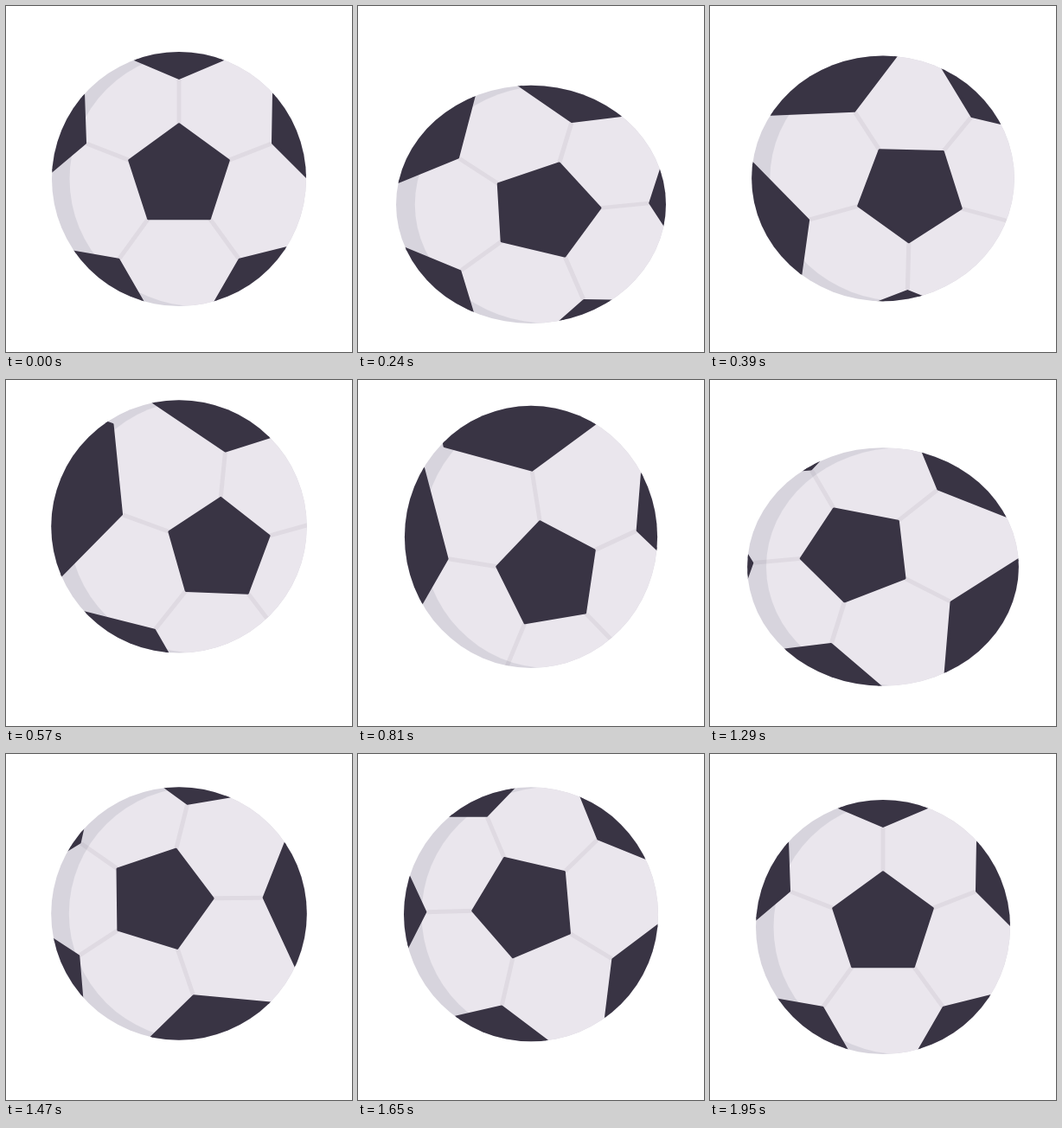
An HTML page with a canvas for the animation above (2040 ms loop, 400 by 400 pixels).

```html
<!DOCTYPE html>
<html lang="en">
<head>
<meta charset="utf-8">
<title>Bouncing ball</title>
<style>
html, body { margin: 0; width: 100%; height: 100%; overflow: hidden; background: #fff; }
canvas { display: block; }
</style>
</head>
<body>
<canvas id="stage" width="400" height="400"></canvas>
<script>
const ctx = document.getElementById('stage').getContext('2d');
const DARK = '#393444', LIGHT = '#eae6ed', SHADE = '#d7d4dd', SEAM = 'rgba(40,30,50,.055)';
const LOOP = 2040, STEP = 30, END = 1950, R = 147, RAD = Math.PI / 180;

const smooth = u => u * u * (3 - 2 * u);
const fall = u => u * u * (2 - u);          // eases out of rest, hits at full speed
const rise = u => u + u * u - u * u * u;    // leaves at full speed, eases into rest

// Keys: [time, value, ease leading to it]
const height = [[0, 200], [195, 237, fall], [665, 164, rise], [1100, 258, fall],
  [1530, 181.7, rise], [END, 200, smooth]];
const radiusX = [[0, R], [195, 157, fall], [665, R, rise], [840, 146, smooth],
  [1100, 169, fall], [1530, R, rise], [END, R, smooth]];
const radiusY = [[0, R], [195, 136.5, fall], [665, R, rise], [840, 152, smooth],
  [1100, 126.5, fall], [1530, R, rise], [END, R, smooth]];

// Drift of the pattern across the ball: [time, x, y]
const drift = [[0, 0, 0], [240, 14.3, 10.4], [600, 43.2, 29.5], [810, 18, 40.4],
  [1290, -25.8, -16.6], [1650, -6, -6.6], [END, 0, 0]];

// Outer patches: inner corner and the directions of its two edges
const patches = [[0, -115, -157, -23], [107, -41, -89, 45], [69, 92, -14, 120],
  [-69, 92, 60, 190], [-107, -41, 140, 268]];

const polar = (x, y, r, deg) => [x + r * Math.cos(deg * RAD), y + r * Math.sin(deg * RAD)];

function segment(keys, t) {
  let i = 1;
  while (i < keys.length - 1 && t > keys[i][0]) i++;
  return i;
}

function tween(keys, t) {
  const i = segment(keys, t), [t0, a] = keys[i - 1], [t1, b, ease] = keys[i];
  return a + (b - a) * ease((t - t0) / (t1 - t0));
}

// Smooth curve through the keys, at rest at both ends
function spline(keys, t, axis) {
  const i = segment(keys, t), a = keys[i - 1], b = keys[i];
  const span = b[0] - a[0], u = (t - a[0]) / span;
  const slope = k => k < 1 || k > keys.length - 2 ? 0
    : (keys[k + 1][axis] - keys[k - 1][axis]) / (keys[k + 1][0] - keys[k - 1][0]);
  return a[axis] + (b[axis] - a[axis]) * smooth(u)
    + span * u * (1 - u) * ((1 - u) * slope(i - 1) - u * slope(i));
}

function disc(x, color) {
  ctx.beginPath();
  ctx.arc(x, 0, R, 0, 2 * Math.PI);
  ctx.fillStyle = color;
  ctx.fill();
}

function shape(points) {
  ctx.beginPath();
  points.forEach(p => ctx.lineTo(...p));
  ctx.closePath();
  ctx.fillStyle = ctx.strokeStyle = DARK;
  ctx.lineWidth = 3;
  ctx.fill();
  ctx.stroke();
}

function patch([x, y, a, b]) {
  const mid = (a + b) / 2, tip = polar(x, y, 1.6, mid);
  const left = polar(...tip, 105, a), right = polar(...tip, 105, b);
  shape([tip, left, polar(...left, 160, mid), polar(...right, 160, mid), right]);
}

function draw(t) {
  ctx.setTransform(1, 0, 0, 1, 0, 0);
  ctx.fillStyle = '#fff';
  ctx.fillRect(0, 0, 400, 400);
  ctx.save();
  ctx.translate(200, tween(height, t));
  ctx.scale(tween(radiusX, t) / R, tween(radiusY, t) / R);
  disc(0, SHADE);
  ctx.clip();
  disc(20.5, LIGHT);

  ctx.translate(spline(drift, t, 1), spline(drift, t, 2));
  ctx.rotate(2 * Math.PI * smooth(t / END));
  ctx.lineJoin = 'round';
  const corners = patches.map((p, i) => polar(0, -3, 60.3, i * 72 - 90));
  ctx.strokeStyle = SEAM;
  ctx.lineWidth = 5;
  ctx.beginPath();
  corners.forEach((c, i) => {
    ctx.moveTo(...c);
    ctx.lineTo(patches[i][0], patches[i][1]);
  });
  ctx.stroke();
  patches.forEach(patch);
  shape(corners);
  ctx.restore();
}

const start = performance.now();
function frame() {
  const t = (performance.now() - start) % LOOP;
  draw(Math.min(Math.floor(t / STEP) * STEP, END));
  requestAnimationFrame(frame);
}
frame();
</script>
</body>
</html>
```
